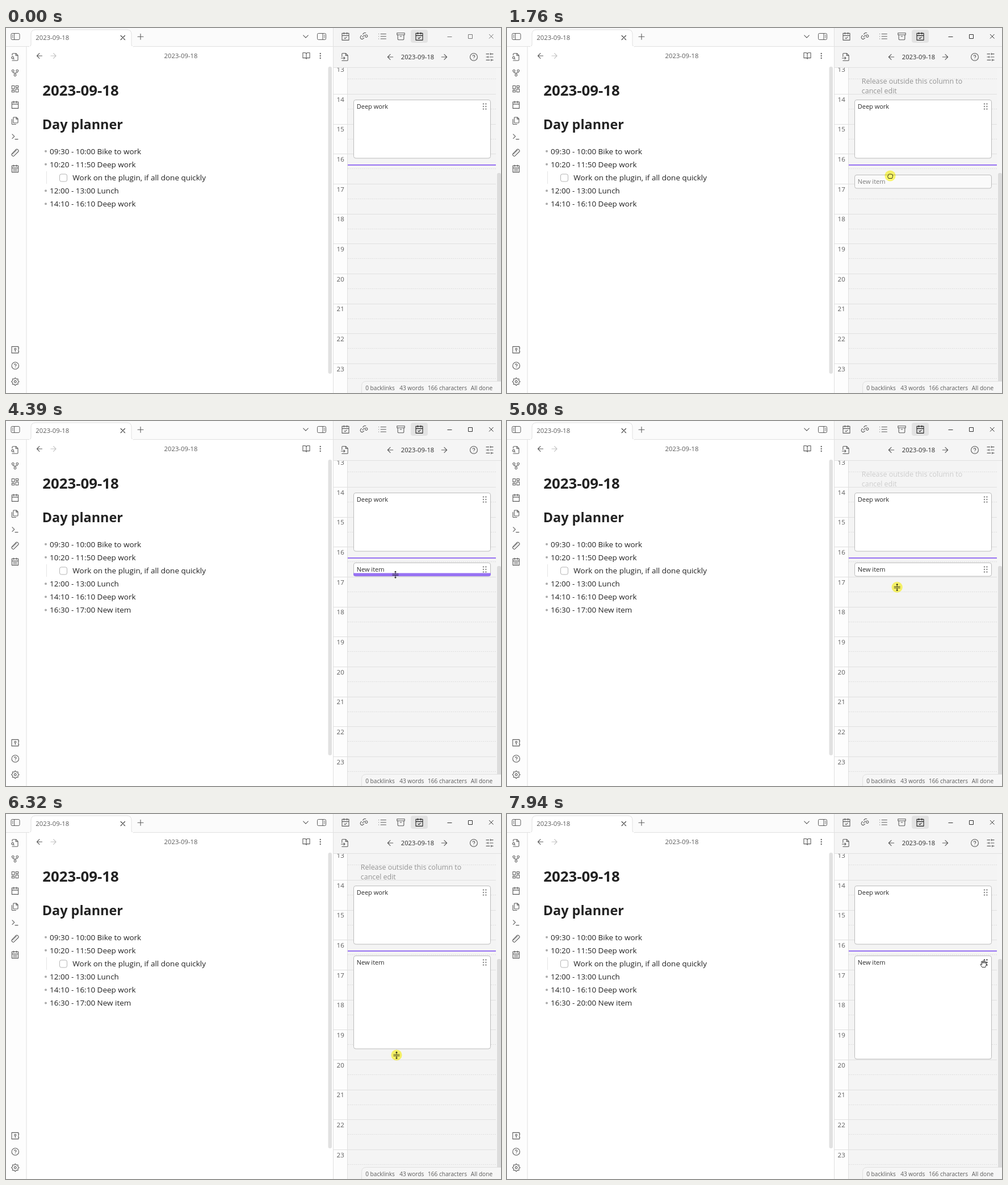
An HTML page for the animation above (8 s loop, 872 by 642 pixels).

```html
<!DOCTYPE html>
<html lang="en">
<head>
<meta charset="utf-8">
<title>Day planner</title>
<style>
  html, body { margin: 0; width: 100%; height: 100%; overflow: hidden; background: #fff }
  svg { display: block; width: 872px; height: 642px; font-family: "Open Sans", "Noto Sans", sans-serif }
  text { white-space: pre }
  .icon { fill: none; stroke-width: 1.1; stroke-linecap: round; stroke-linejoin: round; vector-effect: non-scaling-stroke }
  #halo { mix-blend-mode: multiply }
</style>
</head>
<body>
<svg id="stage" viewBox="0 0 872 642"></svg>
<script>
const GREY = '#5c5c5c', LINE = '#e0e0e0', PURPLE = '#9772f3';
const HOUR = 52.68, SLOT = HOUR / 6;
const hourY = h => 117.05 + (h - 14) * HOUR;

// ---- markup helpers
const rect = (x, y, w, h, fill, more = '') => `<rect x="${x}" y="${y}" width="${w}" height="${h}" fill="${fill}" ${more}/>`;
const line = (x1, y1, x2, y2, color = LINE, more = '') => `<path d="M${x1} ${y1}L${x2} ${y2}" stroke="${color}" ${more}/>`;
const text = (x, y, size, str, fill = '#222', more = '') => `<text x="${x}" y="${y}" font-size="${size}" fill="${fill}" ${more}>${str}</text>`;
const icon = (x, y, size, d, color = GREY, turn = 0) =>
  `<path class="icon" d="${d}" stroke="${color}" transform="translate(${x} ${y}) rotate(${turn}) scale(${size / 24}) translate(-12 -12)"/>`;
const ring = (x, y, r) => `M${x - r} ${y}a${r} ${r} 0 1 0 ${2 * r} 0a${r} ${r} 0 1 0 ${-2 * r} 0`;
const box = (x, y, w, h) => `M${x} ${y}h${w}v${h}h${-w}z`;
const grip = (y, more = '') => `<g fill="#8e8e8e" ${more}>` +
  [0, 1, 2, 3, 4, 5].map(i => `<circle cx="${841 + i % 2 * 4.4}" cy="${y + (i >> 1) * 4.6}" r="1.25"/>`).join('') + '</g>';

// ---- icon shapes on a 24 unit grid
const calendar = box(3, 4, 18, 18) + 'M16 2v4M8 2v4M3 10h18';
const check = calendar + 'M9 16l2 2 4-4';
const help = ring(12, 12, 10) + 'M9 9a3 3 0 0 1 5.8 1c0 2-2.8 3-2.8 3M12 17h.01';
const left = 'M19 12H5M12 19l-7-7 7-7', right = 'M5 12h14M12 5l7 7-7 7';
const cross = 'M6 6l12 12M18 6L6 18';
const gear = 'M' + Array.from({ length: 32 }, (_, i) => {
  const a = (i - .5) * Math.PI / 16, r = i % 4 < 2 ? 10.5 : 8;
  return (12 + r * Math.sin(a)).toFixed(1) + ' ' + (12 - r * Math.cos(a)).toFixed(1);
}).join('L') + 'z' + ring(12, 12, 3);
const link = 'M9 16H6.500a4.500 4.500 0 0 1 0-9H9M14 7h3.500a4.500 4.500 0 0 1 4.300 3.200M8 11.500h7' + ring(17, 17, 3.2);

const ribbon = [
  'M4 22h14a2 2 0 0 0 2-2V7.5L14.5 2H6a2 2 0 0 0-2 2v3M14 2v6h6M9 18l-1.5-1.5' + ring(5, 14, 3),
  ring(12, 18, 3) + ring(6, 6, 3) + ring(18, 6, 3) + 'M18 9v1a2 2 0 0 1-2 2H8a2 2 0 0 1-2-2V9M12 12v3',
  box(3, 3, 7, 9) + box(14, 3, 7, 5) + box(14, 12, 7, 9) + box(3, 16, 7, 5),
  calendar,
  'M15.5 2H8.5Q7 2 7 3.6v12.8Q7 18 8.5 18h10q1.5 0 1.5-1.6V6.5zM3 7.6v12.8Q3 22 4.6 22h9.8M15 2v5h5',
  'M4 17l6-6-6-6M12 19h8',
  'M21.3 8.7L8.7 21.3q-1.7 1.4-3.4 0l-2.6-2.6q-1.4-1.7 0-3.4L15.3 2.7q1.7-1.4 3.4 0l2.6 2.6q1.4 1.7 0 3.4zM7.5 10.5l2 2M10.5 7.5l2 2M13.5 4.5l2 2M4.5 13.5l2 2',
  calendar + 'M7 14h2M11 14h2M15 14h2M7 18h2M11 18h2M15 18h2'
];
const vault = box(2, 3, 19, 18) + ring(12, 10, 2.5) + 'M12 13v4M21 7h1.5M21 17h1.5';

const panel = (x, bar) => `<rect x="${x}" y="9.5" width="15" height="11" rx="2" fill="none" stroke="${GREY}"/>` +
  line(x + bar, 9.5, x + bar, 20.5, GREY) + [12.5, 14.5, 16.5].map(y => line(x + (bar < 8 ? 2 : 11.5), y, x + (bar < 8 ? 3.5 : 13), y, GREY)).join('');

const row = (i, x, str, id = '') =>
  `<g ${id && `id="${id}"`}>${i === 2 ? '' : `<circle cx="70" cy="${216.7 + i * 23.15}" r="2" fill="#ababab"/>`}` +
  text(x, 221.6 + i * 23.15, 13.47, str) + '</g>';

const card = 'rx="3.5" stroke="#bcbcbc"';
const hours = Array.from({ length: 11 }, (_, i) => i + 13);

// ---- static layout
const editor =
  rect(0, 0, 576, 32, '#fbfbfb') + rect(0, 32, 36, 610, '#fdfdfd') +
  line(0, 32.5, 576, 32.5) + line(36, 33, 36, 642) +
  `<path d="M40 33q4 0 4-4V11q0-8 8-8H213q8 0 8 8V29q0 4 4 4" fill="#fff" stroke="${LINE}"/>` +
  rect(41, 32, 183, 2, '#fff') +
  panel(9, 5.5) + panel(548.5, 9.5) +
  text(52.3, 21, 11.3, '2023-09-18', GREY) +
  icon(205.8, 17, 15, cross, '#444') + icon(237, 15.3, 17, 'M12 5v14M5 12h14') + icon(528, 15, 17, 'M6 9l6 6 6-6') +
  icon(59, 49, 15.5, left) + icon(83.5, 49, 15.5, right, '#c2c2c2') +
  text(308, 53.3, 11.3, '2023-09-18', GREY, 'text-anchor="middle"') +
  icon(529, 49, 14.5, 'M2 3h6a4 4 0 0 1 4 4v14a3 3 0 0 0-3-3H2zM22 3h-6a4 4 0 0 0-4 4v14a3 3 0 0 1 3-3h7z') +
  [45, 49, 53].map(y => `<circle cx="553.7" cy="${y}" r="1.15" fill="${GREY}"/>`).join('') +
  ribbon.map((d, i) => icon(16, 51 + i * 28.05, 15, d)).join('') +
  [vault, help, gear].map((d, i) => icon(16.3, 566 + i * 28, 15, d)).join('') +
  text(64.3, 119.4, 25.8, '2023-09-18', '#222', 'font-weight="700"') +
  text(63.8, 178.4, 23.4, 'Day planner', '#222', 'font-weight="700"') +
  row(0, 77, '09:30 - 10:00 Bike to work') +
  row(1, 77, '10:20 - 11:50 Deep work') +
  row(2, 117.3, 'Work on the plugin, if all done quickly') +
  row(3, 77, '12:00 - 13:00 Lunch') +
  row(4, 77, '14:10 - 16:10 Deep work') +
  row(5, 77, '16:30 - 17:00 New item', 'added') +
  line(71.5, 252, 71.5, 274, '#e4e4e4') +
  rect(94.5, 257, 13, 13, '#fff', 'rx="3" stroke="#b4b4b4"') +
  rect(567.5, 68, 6.5, 540, '#e1e1e1', 'rx="3" id="scroll"');

const timeline =
  rect(577, 0, 295, 642, '#f5f5f5') + rect(577, 70, 25, 572, '#fdfdfd') + rect(602, 70, 261, 572, '#f4f4f4') +
  hours.map(h => {
    const y = Math.round(hourY(h)) - .5;
    return line(577, y, 863, y) + line(602, y + 26, 863, y + 26, '#dedede', 'stroke-dasharray="2 1.5"') +
      text(589.2, hourY(h) + 12.6, 11.5, h, GREY, 'text-anchor="middle"');
  }).join('') +
  line(601.5, 70, 601.5, 642) +
  `<g id="hint">${text(624.8, 97.8, 12.46, 'Release outside this column to', '#949494')}${text(624.8, 115.2, 12.46, 'cancel edit', '#949494')}</g>` +
  rect(602, 240, 261, 2, PURPLE) +
  rect(612.5, 126.5, 241, 102.5, '#fff', card) + text(617.7, 142, 11, 'Deep work', '#2a2a2a') + grip(133.4) +
  `<g id="item">${rect(612.5, 249.5, 241, 24, '#fff', card)}${text(617.7, 264.8, 11, 'New item')}${grip(256.4, 'id="grip"')}` +
  `<path id="bar" d="M612 267.5h242v2q0 3.5-3.5 3.5h-235q-3.5 0-3.5-3.5z" fill="${PURPLE}"/></g>` +
  rect(865, 255, 7, 387, '#dcdcdc', 'rx="3"');

const sideHeader =
  rect(577, 0, 295, 70, '#f5f5f5') + line(577, 32.5, 872, 32.5) + line(577, 69.5, 872, 69.5) + line(576.5, 0, 576.5, 642) +
  rect(713, 3, 30, 23, '#e3e3e3', 'rx="4"') +
  icon(598, 14.7, 16, check) +
  icon(630, 14.2, 16, link, GREY, -45) +
  icon(663, 14.7, 17, 'M8 6h13M8 12h13M8 18h13M3 6h.01M3 12h.01M3 18h.01') +
  icon(695.5, 14.7, 16, box(2, 3, 20, 5) + 'M4 8v11a2 2 0 0 0 2 2h12a2 2 0 0 0 2-2V8M10 12h4') +
  icon(728, 14.7, 16, check, '#222') +
  '<path id="windowButtons" d="M777.5 15.5h8M814.5 11.5h7v7h-7zM851 11l7.5 7.5M858.5 11l-7.5 7.5" fill="none"/>' +
  icon(597, 51, 15.5, 'M4 11V4a2 2 0 0 1 2-2h8.5L20 7.5V20a2 2 0 0 1-2 2H4M14 2v6h6M2 15h10M9 18l3-3-3-3') +
  icon(677, 51, 16, left) + icon(772, 51, 16, right) +
  text(725, 55.2, 11.2, '2023-09-18', '#2c2c2c', 'text-anchor="middle" font-weight="500"') +
  icon(824, 51, 15.5, help) +
  icon(852, 51, 16, 'M21 4h-7M10 4H3M21 12h-9M8 12H3M21 20h-5M12 20H3M14 2v4M8 10v4M16 18v4');

const statusBar =
  `<path d="M626.5 643V629.5q0-8 8-8H873V643z" fill="#f6f6f6" stroke="${LINE}"/>` +
  [[633.2, '0 backlinks'], [693.2, '43 words'], [743, '166 characters'], [818.8, 'All done']]
    .map(([x, s]) => text(x, 636.7, 10.1, s, GREY)).join('');

const pointer = `<g id="pointer">
  <g stroke="#111" stroke-width=".85" stroke-linejoin="round" fill="#fff">
    <path id="arrow" d="M0 0V10.2l2.3-2.1 1.6 3.7 1.7-.8-1.6-3.5h3.1z"/>
    <path id="fist" d="M-3 4.500L-4.300 1.500Q-4.500-.5-3.200-.5V-2q1-1.800 2.100-.6 1-1.400 2.100 0 1.200-1 1.900.3 1.500-.3 1.500 1.300V1.500L3.200 4.500z"/>
    <path id="hand" d="M-2.5 6L-5.500 1.500q-.4-1.800 1.800-.7L-2.800 1.800-4-3.500q.3-1.500 1.700-.5L-1.500-1-1.300-5q.9-1.400 1.700 0L.7-1.200 1.600-4.600q1.200-1 1.600.3L2.900-.6 4.100-2.600q1.400-.6 1.300.8L4.300 3 3.300 6z"/>
  </g>
  <path id="resize" d="M-5.500-.9H5.500M-5.500 1.500H5.500M0-1V-5M0 1.500V5.500M-1.300-4.300L0-6 1.300-4.300zM-1.300 4.900L0 6.600 1.300 4.900z" stroke="#222" fill="#222" stroke-width=".85"/>
  <circle id="halo" r="9.6" fill="#fffb6c"/>
</g>`;

document.getElementById('stage').innerHTML =
  rect(0, 0, 872, 642, '#fff') + editor + timeline + sideHeader + statusBar + pointer;

// ---- motion
const $ = id => document.getElementById(id);
const show = (id, on) => $(id).style.display = on ? '' : 'none';
const itemBox = $('item').children[0], itemText = $('item').children[1];
const addedText = $('added').lastChild;

// bursts of updates: first time, last time, count
const bursts = [[190, 900, 10], [1530, 1610, 2], [1760, 2230, 7], [2700, 2700, 1], [3870, 4390, 8], [4620, 5390, 11],
  [5470, 6250, 11], [6320, 6620, 5], [6780, 6930, 3], [7080, 7870, 11], [7940, 7940, 1]];

function lastUpdate(t) {
  let s = 0;
  for (const [a, b, n] of bursts) if (t >= a) {
    const d = (b - a) / (n - 1 || 1);
    s = a + d * Math.min(n - 1, Math.floor((t - a) / (d || 1) + .1));
  }
  return s;
}

// pointer path: time, x, y
const path = [[190, 842, 630], [340, 796, 500], [500, 738, 375], [700, 690, 285], [900, 676, 260], [1530, 675, 260],
  [1760, 675, 260], [2230, 676, 253], [3800, 676, 253], [4390, 686, 270], [4620, 686, 270], [5000, 687, 283],
  [5390, 688, 327], [5620, 688.5, 367], [5850, 688, 395], [6250, 688, 421], [6320, 688, 424], [6620, 688, 436.5],
  [7000, 688, 436.5], [7870, 831, 264], [7940, 839.5, 263.5]];

function pointerAt(t) {
  const i = path.findIndex(p => p[0] > t);
  if (i < 0) return path.at(-1).slice(1);
  if (!i) return path[0].slice(1);
  const [a, x, y] = path[i - 1], [b, u, v] = path[i], k = (t - a) / (b - a);
  return [x + (u - x) * k, y + (v - y) * k];
}

const slotOf = y => Math.floor((y - hourY(17)) / SLOT);
const slotY = i => hourY(17) + i * SLOT;

function draw(now) {
  const s = lastUpdate(now % 8000), [x, y] = pointerAt(s);
  const creating = s >= 1530 && s < 2700, resizing = s >= 4620 && s < 6780;
  const hovering = y > 263 && s > 3870 && s < 4620;

  // item: follows the pointer, then its end trails one update behind
  const start = creating ? slotOf(y) : -3;
  const end = creating ? start + 3 : s < 4620 ? 0 : Math.max(0, slotOf(pointerAt(Math.min(s, 6700) - 77)[1]));
  const top = Math.round(slotY(start)) + .5;
  itemBox.setAttribute('y', top);
  itemBox.setAttribute('height', Math.round(slotY(end) - 2.2) - top);
  itemBox.setAttribute('fill', creating ? '#fafafa' : '#fff');
  itemText.setAttribute('y', top + 15.3);
  itemText.setAttribute('fill', creating ? '#7c7c7c' : '#2a2a2a');
  show('item', s >= 1530);
  show('grip', s >= 2700);
  $('grip').setAttribute('fill', s >= 7940 ? '#444' : '#8e8e8e');
  show('bar', hovering);

  show('hint', creating || resizing);
  $('hint').setAttribute('opacity', s >= 6320 || creating && s >= 1760 ? 1 : .4);

  show('added', s >= 2700);
  addedText.textContent = `16:30 - ${s < 6780 ? '17' : '20'}:00 New item`;
  $('scroll').setAttribute('height', s < 2700 ? 540 : 520);
  $('windowButtons').setAttribute('stroke', s < 1530 ? '#777' : '#333');

  const shape = creating ? 'fist' : hovering || resizing ? 'resize' : s >= 7940 ? 'hand' : 'arrow';
  for (const id of ['arrow', 'fist', 'hand', 'resize']) show(id, id === shape);
  show('pointer', s >= 190);
  show('halo', creating || resizing);
  $('pointer').setAttribute('transform', `translate(${x} ${y})`);
}

let origin;
function tick(now) {
  origin ??= now;
  draw(now - origin);
  requestAnimationFrame(tick);
}
draw(0);
requestAnimationFrame(tick);
</script>
</body>
</html>
```
